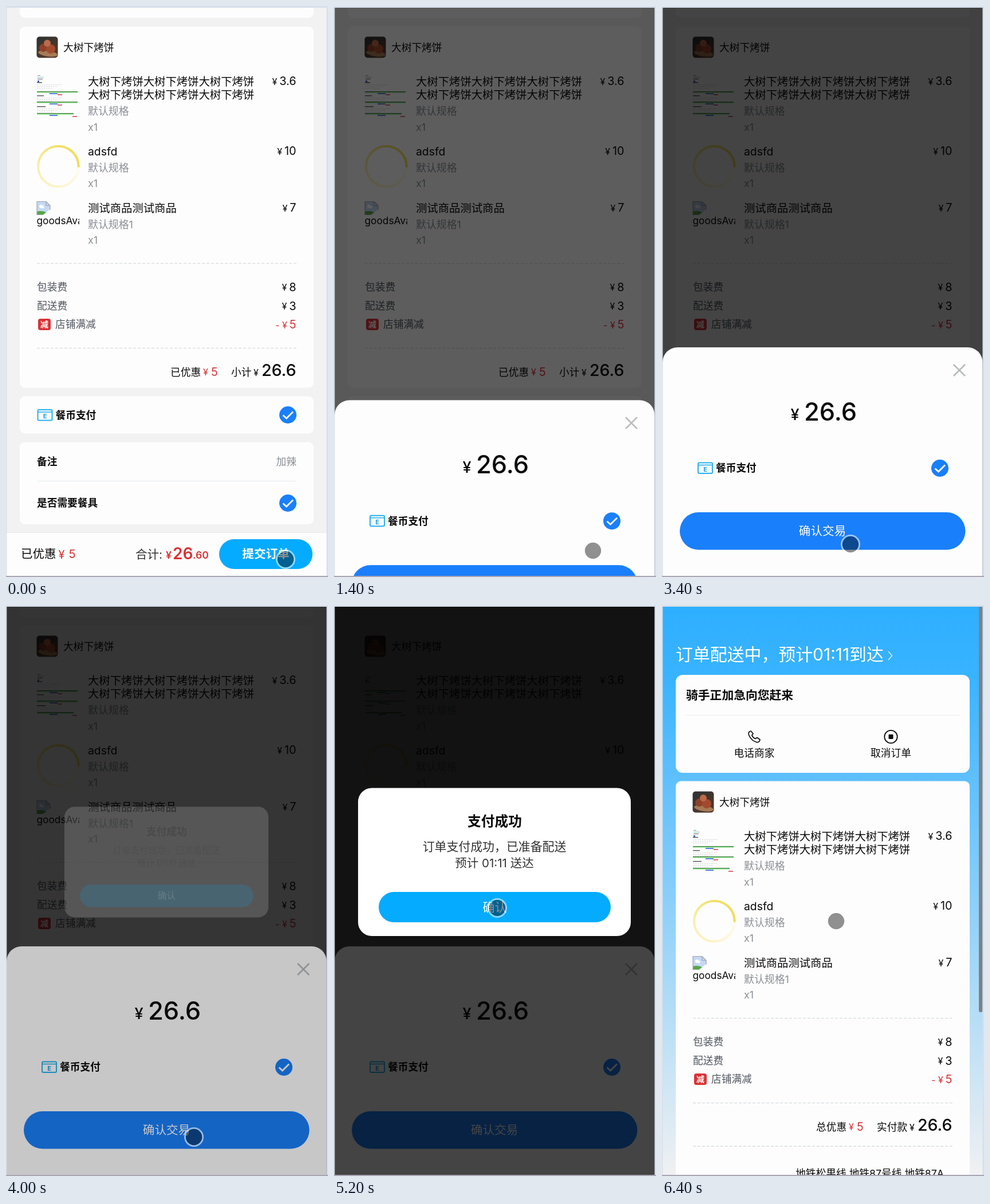
Recreate the animation shown at these times as an HTML page with a canvas. Size 562x997 px, loop 6.6 s.

```html
<!DOCTYPE html>
<html lang="zh-CN">
<head>
<meta charset="utf-8">
<title>Checkout</title>
<style>
html, body { margin: 0; width: 100%; height: 100%; overflow: hidden; background: #fff; }
canvas { display: block; width: 562px; height: 997px; }
</style>
</head>
<body>
<canvas id="stage" width="562" height="997"></canvas>
<script>
const ctx = document.getElementById('stage').getContext('2d');
const LOOP = 6600, STEP = 200, DIM = 0.73;
const FONT = 'Inter, "Noto Sans CJK SC", "Noto Sans CJK", sans-serif';
const INK = '#0b0b0c', GREY = '#8b8f96', SLATE = '#51565f', RED = '#db3236';
const WHITE = '#fdfdfd', BLUE = '#1a7ffa', SKY = '#04abff';
const SHOP = '大树下烤饼';
const SCROLLED = 272;

// Text is placed by its vertical centre.
function text(str, x, cy, size, color = INK, weight = 400, align = 'left') {
  ctx.font = `${weight} ${size}px ${FONT}`;
  ctx.fillStyle = color;
  ctx.textAlign = align;
  ctx.fillText(str, x, cy + size * 0.36);
  return ctx.measureText(str).width;
}

function box(x0, y0, x1, y1, r, color) {
  ctx.fillStyle = color;
  ctx.beginPath();
  ctx.roundRect(x0, y0, x1 - x0, y1 - y0, r);
  ctx.fill();
}

function disc(x, y, r, color) {
  ctx.fillStyle = color;
  ctx.beginPath();
  ctx.arc(x, y, r, 0, Math.PI * 2);
  ctx.fill();
}

function stroke(points, color, width, dash = []) {
  ctx.strokeStyle = color;
  ctx.lineWidth = width;
  ctx.setLineDash(dash);
  ctx.beginPath();
  points.forEach(([x, y]) => ctx.lineTo(x, y));
  ctx.stroke();
  ctx.setLineDash([]);
}

function price(value, cy, color = INK, sign = '') {
  const w = text(value, 506.5, cy, 19.8, color, 400, 'right');
  text(sign + '¥', 506.5 - w - 4, cy + 1, 16, color, 400, 'right');
}

function check(x, y) {
  disc(x, y, 15, BLUE);
  stroke([[x - 8.5, y + 0.5], [x - 2.5, y + 6], [x + 9, y - 5.5]], '#fff', 2.8);
}

function mealCoin(x, cy) {
  ctx.strokeStyle = '#26b0ee';
  ctx.lineWidth = 2;
  ctx.beginPath();
  ctx.roundRect(x + 1, cy - 9.5, 25, 18.5, 2);
  ctx.stroke();
  stroke([[x + 1, cy - 5.5], [x + 26, cy - 5.5]], '#26b0ee', 1.6);
  text('E', x + 13.5, cy + 2, 11, '#1c9fe4', 700, 'center');
  text('餐币支付', x + 32, cy, 17.7, INK, 700);
}

function foodPhoto() {
  ctx.save();
  ctx.beginPath();
  ctx.roundRect(53.5, 53.5, 37, 37, 5);
  ctx.clip();
  const g = ctx.createLinearGradient(54, 54, 80, 91);
  g.addColorStop(0, '#2c3232');
  g.addColorStop(1, '#54382b');
  ctx.fillStyle = g;
  ctx.fillRect(53, 53, 38, 38);
  ctx.fillStyle = '#a77a55';
  ctx.beginPath();
  ctx.ellipse(73, 83, 17, 5, 0.15, 0, 7);
  ctx.fill();
  disc(65, 73, 7, '#8f4029');
  disc(78, 75, 8, '#a34a2e');
  disc(72, 65, 6, '#bd6a48');
  ctx.restore();
}

function miniDocument() {
  const bar = (x, y, w, h, c) => { ctx.fillStyle = c; ctx.fillRect(x, y, w, h); };
  for (let i = 0; i < 4; i++) bar(55, 121 + i * 3, [5, 11, 9, 3][i], i === 3 ? 3 : 1, ['#889', '#7ac6bd', '#657', '#4867c8'][i]);
  [133, 156, 175].forEach((y, i) => {
    bar(54, y, 9 + i * 3, 1.4, '#555');
    for (let row = 0; row < 3; row++)
      for (let x = 54; x < 98 - row * 8; x += 4) bar(x, y + 4 + row * 3, 2.5, 0.7, '#c4c6ca');
  });
  [149, 167, 187].forEach((y, i) => {
    bar(54, y, i === 2 ? 64 : 71, 2.5, '#79d775');
    bar(54, y, i === 2 ? 64 : 71, 0.8, '#315f35');
    bar(76, y + 3, 14, 2, '#5580d9');
    bar(i === 2 ? 116 : 90, y + 5, 8, 1.8, '#d65c6c');
  });
}

function loadingRing() {
  const g = ctx.createConicGradient(0, 91.3, 280);
  g.addColorStop(0, '#fffbea');
  g.addColorStop(0.5, '#f9eeae');
  g.addColorStop(0.75, '#f2e068');
  g.addColorStop(1, '#f0dc55');
  ctx.strokeStyle = g;
  ctx.lineWidth = 4;
  ctx.beginPath();
  ctx.arc(91.3, 280, 35.3, 0, Math.PI * 2);
  ctx.stroke();
  disc(126.6, 280, 2, '#f0dc55');
}

function brokenImage() {
  ctx.save();
  ctx.beginPath();
  [[54, 341], [70, 341], [77, 348], [77, 357], [64, 365], [54, 365]].forEach(p => ctx.lineTo(...p));
  ctx.closePath();
  ctx.fillStyle = '#c5d8f4';
  ctx.fill();
  ctx.clip();
  ctx.fillStyle = '#58a646';
  ctx.beginPath();
  ctx.ellipse(60, 366, 14, 8, 0, 0, 7);
  ctx.fill();
  disc(61, 350, 3, '#fff');
  disc(64, 351, 2.5, '#fff');
  stroke([[64, 367], [79, 355]], '#fff', 3);
  ctx.restore();
  stroke([[64, 364.5], [54, 364.5], [54, 341.5], [70, 341.5], [77, 348.5], [77, 356]], '#a2a5aa', 1.2);
  stroke([[70, 341.5], [70, 348.5], [77, 348.5]], '#a2a5aa', 1.2);
  ctx.save();
  ctx.beginPath();
  ctx.rect(53, 360, 75, 34);
  ctx.clip();
  text('goodsAvatar', 53.5, 374.5, 17.3);
  ctx.restore();
}

function item(y, title, spec, cost) {
  title.forEach((line, i) => text(line, 143, y + i * 23.5, 19.35));
  const specY = y + (title.length - 1) * 23.5 + 28.5;
  text(spec, 143, specY, 17.9, GREY);
  text('x1', 143, specY + 27.5, 17.9, GREY);
  price(cost, y - 1);
}

const dashes = y => stroke([[54, y], [507, y]], '#dcdee1', 1.3, [5, 3]);

function orderDetails(savedLabel, savedX, totalLabel, totalX) {
  foodPhoto();
  text(SHOP, 100, 72.5, 17.7);
  miniDocument();
  loadingRing();
  brokenImage();
  const longTitle = SHOP.repeat(3);
  item(132, [longTitle, longTitle], '默认规格', '3.6');
  item(254, ['adsfd'], '默认规格', '10');
  item(353, ['测试商品测试商品'], '默认规格1', '7');
  dashes(449.5);
  text('包装费', 54, 491, 17.7, SLATE);
  price('8', 490.5);
  text('配送费', 54, 523.5, 17.7, SLATE);
  price('3', 523.5);
  box(56, 546, 78, 566, 4, RED);
  text('减', 67, 556, 14, '#fff', 700, 'center');
  text('店铺满减', 86, 556, 17.7, SLATE);
  price('5', 556, RED, '- ');
  dashes(597.5);
  text(savedLabel, savedX, 640, 17.7);
  text('¥', savedX + 57, 639, 16, RED);
  text('5', savedX + 71, 638.5, 19.8, RED);
  text(totalLabel, totalX, 640, 17.7);
  text('¥', 432, 640, 16);
  text('26.6', 506.5, 636, 28.6, INK, 500, 'right');
}

function checkoutPage() {
  ctx.fillStyle = '#f2f2f2';
  ctx.fillRect(0, 0, 562, 997);
  box(24, -20, 537, 20.5, 9, WHITE);
  box(24, 36, 537, 666.5, 9, WHITE);
  orderDetails('已优惠', 287, '小计', 393);
  box(24, 681.5, 537, 746.5, 9, WHITE);
  mealCoin(54.5, 714.5);
  check(492, 714);
  box(24, 761.5, 537, 905, 9, WHITE);
  text('备注', 54, 796, 17.7, INK, 700);
  text('加辣', 507, 796, 17.7, GREY, 400, 'right');
  stroke([[54, 829.5], [507, 829.5]], '#ebedf0', 1.4);
  text('是否需要餐具', 54, 868, 17.7, INK, 700);
  check(492, 868);
  ctx.fillStyle = WHITE;
  ctx.fillRect(0, 919, 562, 78);
  stroke([[0, 919.5], [562, 919.5]], '#e9eaec', 1);
  text('已优惠', 26, 957, 20.5);
  text('¥', 91.5, 957.5, 20, RED);
  text('5', 109.5, 957, 20.5, RED);
  text('合计:', 226, 958, 20.5, '#323233');
  text('¥', 279, 959, 17.5, RED, 600);
  text('26', 291, 956, 28, RED, 600);
  text('.60', 326, 959, 17.5, RED, 600);
  box(372, 931, 535, 983, 26, SKY);
  text('提交订单', 453.5, 957, 20.6, '#fff', 700, 'center');
}

function phoneIcon(x, y) {
  ctx.strokeStyle = INK;
  ctx.lineWidth = 1.7;
  ctx.lineJoin = 'round';
  ctx.beginPath();
  ctx.moveTo(x - 6, y - 10);
  ctx.quadraticCurveTo(x - 11, y - 9, x - 9.5, y - 3);
  ctx.quadraticCurveTo(x - 5, y + 7, x + 4, y + 9.5);
  ctx.quadraticCurveTo(x + 9, y + 10.5, x + 10, y + 5);
  ctx.lineTo(x + 5, y + 1.5);
  ctx.lineTo(x + 1.5, y + 3.5);
  ctx.quadraticCurveTo(x - 3, y + 1, x - 4, y - 2.5);
  ctx.lineTo(x - 2, y - 5.5);
  ctx.closePath();
  ctx.stroke();
  ctx.lineJoin = 'miter';
}

function deliveryPage() {
  const g = ctx.createLinearGradient(0, 3, 0, 995);
  g.addColorStop(0, '#2eafff');
  g.addColorStop(0.12, '#38b3ff');
  g.addColorStop(1, '#f0f1f2');
  ctx.fillStyle = g;
  ctx.fillRect(0, 0, 562, 997);
  text('订单配送中，预计01:11到达', 24, 86, 29.9, '#fff');
  stroke([[395, 81], [401.5, 88.5], [395, 96]], '#d8efff', 1.5);
  box(24, 122, 537, 293, 12, WHITE);
  text('骑手正加急向您赶来', 42, 158, 20.8, INK, 700);
  stroke([[42, 192.5], [519, 192.5]], '#ebedf0', 1.2);
  phoneIcon(161, 230);
  text('电话商家', 161, 259, 17.7, INK, 400, 'center');
  ctx.strokeStyle = INK;
  ctx.lineWidth = 1.8;
  ctx.beginPath();
  ctx.arc(399.5, 230, 11.2, 0, 7);
  ctx.stroke();
  box(395.5, 226, 403.5, 234, 1, INK);
  text('取消订单', 399.5, 259, 17.7, INK, 400, 'center');
  box(24, 307.5, 537, 1010, 9, WHITE);
  ctx.save();
  ctx.translate(0, SCROLLED);
  orderDetails('总优惠', 269, '实付款', 375);
  dashes(673);
  ctx.restore();
  text('地铁松果线,地铁87号线,地铁87A', 492, 992.5, 17.7, INK, 400, 'right');
  box(553, -4, 559.5, 711, 3, '#7d8187');
}

function paySheet(top) {
  ctx.save();
  ctx.translate(0, top);
  box(1, 0, 559.5, 440, [26, 26, 0, 0], WHITE);
  stroke([[509, 30], [529, 50]], '#b9babd', 2.6);
  stroke([[529, 30], [509, 50]], '#b9babd', 2.6);
  text('¥', 224.5, 117, 27, INK, 500);
  text('26.6', 340, 112.5, 43.4, INK, 500, 'right');
  mealCoin(62, 211);
  check(485, 211);
  box(31, 288, 529.5, 353.5, 33, BLUE);
  text('确认交易', 280, 321, 20.6, '#fff', 400, 'center');
  ctx.restore();
}

function successDialog(scale, opacity) {
  ctx.save();
  ctx.globalAlpha = opacity;
  ctx.translate(280, 449);
  ctx.scale(scale, scale);
  ctx.translate(-280, -449);
  box(42, 319.5, 518, 578, 24, '#fff');
  text('支付成功', 280.5, 377, 23.7, INK, 700, 'center');
  text('订单支付成功，已准备配送', 280, 421, 20.9, '#323233', 400, 'center');
  text('预计 01:11 送达', 280, 450.5, 20.5, '#323233', 400, 'center');
  box(78, 501, 483, 554, 26.5, SKY);
  text('确认', 280.5, 527.5, 20.9, '#fff', 400, 'center');
  ctx.restore();
}

function dim(alpha) {
  ctx.fillStyle = `rgba(0,0,0,${alpha})`;
  ctx.fillRect(0, 0, 562, 997);
}

// Progress 0..1 of a 300 ms transition, plain and eased.
const progress = (t, start) => Math.min(1, Math.max(0, (t - start) / 300));
const easeIn = (t, start) => progress(t, start) ** 2;
const easeOut = (t, start) => 1 - (1 - progress(t, start)) ** 2;

const POINTER = [
  [0, 488, 966], [600, 489, 972], [1200, 486, 969], [1400, 452, 951], [2200, 285, 874],
  [2800, 322, 936], [3400, 329, 940], [4000, 328, 929], [4700, 288, 545],
  [5200, 285, 529], [5800, 288, 533], [6200, 304, 552], [LOOP, 304, 552]
];

function pointer(t) {
  const i = POINTER.findIndex(p => p[0] > t);
  const [t0, x0, y0] = POINTER[i - 1], [t1, x1, y1] = POINTER[i];
  const k = (t - t0) / (t1 - t0);
  const x = x0 + (x1 - x0) * k, y = y0 + (y1 - y0) * k;
  disc(x, y, 14.3, 'rgba(0,0,0,0.43)');
  ctx.strokeStyle = 'rgba(255,255,255,0.55)';
  ctx.lineWidth = 2.8;
  ctx.beginPath();
  ctx.arc(x, y, 15.6, 0, Math.PI * 2);
  ctx.stroke();
}

function windowEdge() {
  ctx.fillStyle = '#d8dfea';
  ctx.fillRect(0, 0, 562, 3);
  ctx.fillRect(0, 0, 1.3, 997);
  ctx.fillRect(559.5, 0, 3, 997);
  ctx.fillStyle = '#aaa6b4';
  ctx.fillRect(0, 995, 562, 2);
}

function draw(t) {
  const arrived = t >= 6200;
  if (arrived) {
    deliveryPage();
    dim(DIM * (1 - easeIn(t, 6020)));
    const leave = easeOut(t, 6020);
    successDialog(1 - 0.1 * leave, 1 - leave);
  } else {
    checkoutPage();
    dim(DIM * easeOut(t, 1210));
    const rise = easeOut(t, 1244);
    if (rise > 0) paySheet(996 - 400 * rise);
    dim(DIM * easeOut(t, 3952));
    const enter = easeOut(t, 3975);
    successDialog(0.7 + 0.3 * enter, enter);
  }
  pointer(t);
  windowEdge();
}

function tick() {
  const t = performance.now() % LOOP;
  draw(Math.floor(t / STEP) * STEP);
  requestAnimationFrame(tick);
}
tick();
</script>
</body>
</html>
```
